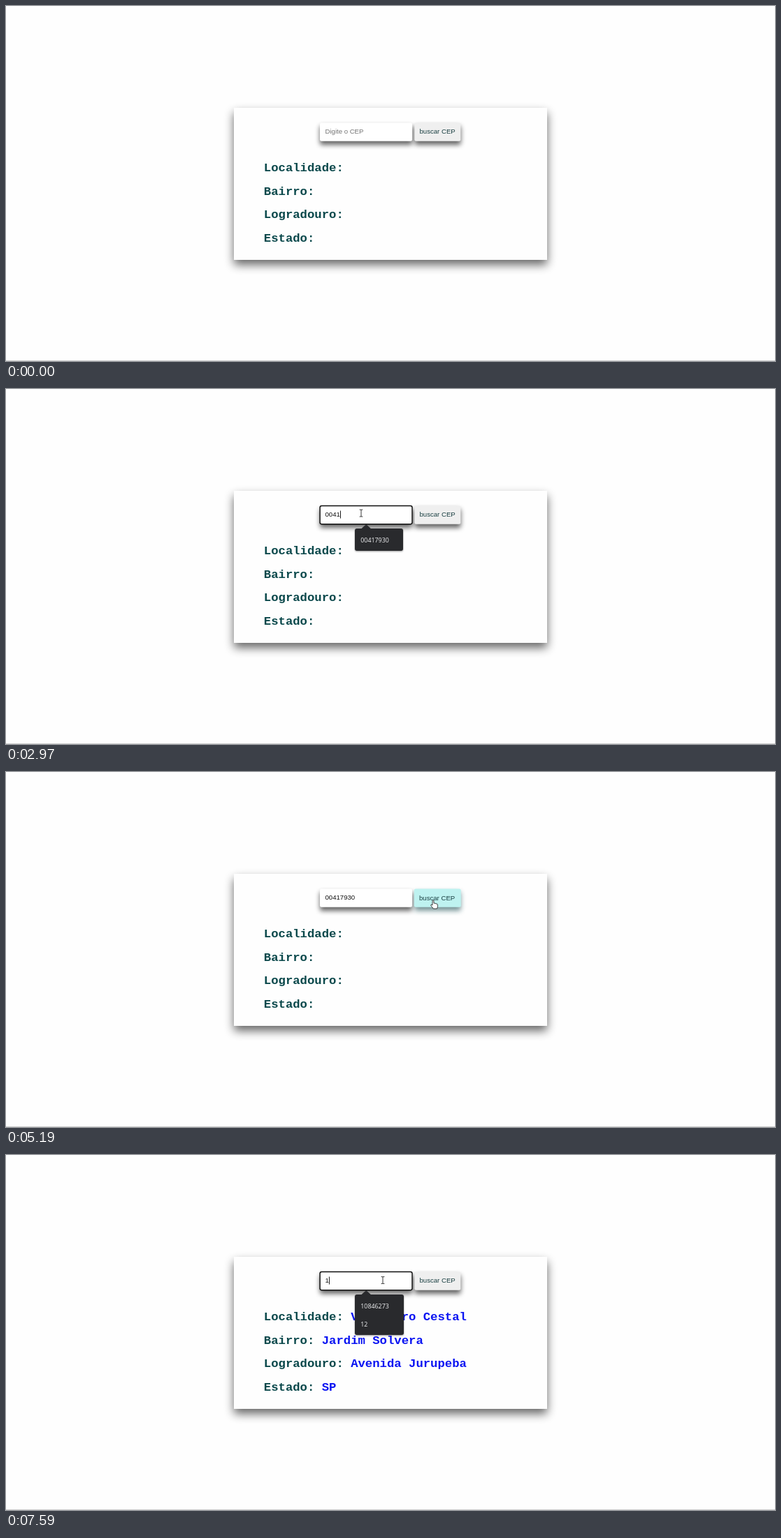
These frames come from a looping animation (1100x509 px, 8 s). An HTML page:

```html
<!DOCTYPE html>
<html lang="pt-BR">
<head>
<meta charset="utf-8">
<title>Buscar CEP</title>
<style>
html, body { margin: 0; width: 100%; height: 100%; overflow: hidden; background: #fefefe; }
svg { display: block; width: 1100px; height: 509px; }
text { white-space: pre; }
.head { font: bold 17.28px "Liberation Mono", monospace; fill: #0a484b; }
.head .val { fill: #0a14f2; }
.ui { font: 9.6px "Liberation Sans", Arial, sans-serif; }
.pop { font: 8.85px "Open Sans", "Noto Sans", sans-serif; fill: #f1f2f4; }
</style>
</head>
<body>
<svg viewBox="0 0 1100 509">
  <defs>
    <filter id="wide" x="-10%" y="-20%" width="120%" height="140%"><feGaussianBlur stdDeviation="7"/></filter>
    <filter id="soft" x="-20%" y="-60%" width="140%" height="220%"><feGaussianBlur stdDeviation="3.6"/></filter>
    <filter id="thin" x="-20%" y="-20%" width="140%" height="140%"><feGaussianBlur stdDeviation="1"/></filter>
  </defs>
  <rect width="1100" height="509" fill="#fefefe"/>
  <rect y="508" width="1100" height="1" fill="#cfcfcf"/>

  <rect x="326" y="153" width="448" height="218" fill="#000" opacity=".6" filter="url(#wide)"/>
  <rect x="326" y="146" width="448" height="218" fill="#fefefe"/>
  <g id="rows"></g>

  <rect x="449" y="172" width="132" height="27" rx="2.5" opacity=".6" filter="url(#soft)"/>
  <rect id="btnShade" x="584.5" y="172" width="66" height="27" rx="2.5" opacity=".6" filter="url(#soft)"/>
  <rect x="449" y="167.5" width="132" height="26.3" rx="2.5" fill="#fff"/>
  <rect id="ring" x="449.1" y="167.5" width="131.9" height="26.2" rx="2.4" fill="none" stroke="#101010" stroke-width="1.5"/>
  <rect id="btn" y="167.5" height="26.3" rx="2.5"/>
  <text id="btnText" class="ui" fill="#1b4043">buscar CEP</text>

  <rect id="sel" x="456.4" y="174.2" width="43" height="11.8" fill="#3390ff"/>
  <text id="field" class="ui" x="456.5" y="183.4"></text>
  <rect id="caret" y="174.5" width="0.9" height="11" fill="#000"/>

  <g id="popup">
    <rect id="popShade" x="499" y="201" width="70" rx="3" opacity=".4" filter="url(#thin)"/>
    <path d="M508 200.5L515.2 194L522.4 200.5Z" fill="#292a2d"/>
    <rect id="popBox" x="499" y="200" width="70" rx="3" fill="#292a2d"/>
    <g id="items"></g>
  </g>

  <g id="cursor">
    <path id="arrow" d="M0 0V10.2L2.3 8.1L3.9 11.6L5.4 10.9L3.9 7.5H7Z" fill="#fff" stroke="#222" stroke-width=".8"/>
    <path id="beam" d="M-2.3 -5H-.6Q0 -5 0 -4.3Q0 -5 .6 -5H2.3M0 -4.4V4.4M-2.3 5H-.6Q0 5 0 4.3Q0 5 .6 5H2.3" fill="none" stroke="#222" stroke-width=".9"/>
    <path id="hand" d="M-1 .6Q0 -.9 1 .6V4.2Q2.2 3.5 3 4.7Q4.2 4.1 4.9 5.2Q6.3 4.8 6.5 6.4V8.6Q6.4 10.3 5.4 12H.2Q-1.2 9.8 -3.2 7.5Q-3.5 5.7 -1.9 6.2L-1 7.1Z" fill="#fff" stroke="#222" stroke-width=".85"/>
  </g>
</svg>
<script>
const LOOP = 8000;
const CEP = "00417930", OTHER = "10846273";
const ROWS = [
  ["Localidade:", "Valdomiro Cestal"],
  ["Bairro:", "Jardim Solvera"],
  ["Logradouro:", "Avenida Jurupeba"],
  ["Estado:", "SP"]
];
const KEYS = [2360, 2630, 2770, 2970, 3250, 3580, 3650, 3860];
const FOCUS = 1370, CLICK = 5190, RESULT = 5330, REFOCUS = 6130, SELECT = 6400, RETYPE = 7460;
// time, x, y of the pointer
const PATH = [
  [120, 1083, 498], [880, 516, 227], [1230, 508, 178], [4380, 508, 178],
  [4580, 606.5, 185], [4930, 611, 184], [5330, 611, 184],
  [5640, 760.5, 320.5], [5700, 760.5, 320.5], [6130, 539, 179.5]
];

const $ = id => document.getElementById(id);
const set = (id, attrs) => { for (const k in attrs) $(id).setAttribute(k, attrs[k]); };
const show = (id, on) => { $(id).style.display = on ? "" : "none"; };
const ramp = (t, a, b) => Math.min(1, Math.max(0, (t - a) / (b - a)));
const ease = u => u * u * (3 - 2 * u);
const within = (t, a, b) => t >= a && t < b;
const mix = (a, b, u) => "rgb(" + a.map((v, i) => Math.round(v + (b[i] - v) * u)) + ")";

$("rows").innerHTML = ROWS.map(([name, value], i) =>
  `<text class="head" x="368.8" y="${237 + i * 33.5}">${name}<tspan class="val"> ${value}</tspan></text>`).join("");
const values = document.querySelectorAll(".val");

function pointer(t) {
  let i = 0;
  while (i < PATH.length - 2 && t >= PATH[i + 1][0]) i++;
  const [t0, x0, y0] = PATH[i], [t1, x1, y1] = PATH[i + 1];
  const u = ease(ramp(t, t0, t1));
  return [x0 + (x1 - x0) * u, y0 + (y1 - y0) * u];
}

function drawPointer(t) {
  const [x, y] = pointer(t);
  const level = y > 167 && y < 194;
  const beam = level && x > 449 && x < 581;
  const hand = level && x > 584 && x < 651;
  show("cursor", t >= 120);
  show("beam", beam);
  show("hand", hand);
  show("arrow", !beam && !hand);
  set("cursor", { transform: `translate(${x.toFixed(2)} ${y.toFixed(2)})` });
}

function drawField(t) {
  const typed = t >= RETYPE ? "1" : CEP.slice(0, KEYS.filter(k => t >= k).length);
  const selected = within(t, SELECT, RETYPE);
  const focused = within(t, FOCUS, CLICK) || t >= REFOCUS;
  $("field").textContent = typed || "Digite o CEP";
  set("field", { fill: selected ? "#fff" : typed ? "#111" : "#757575" });
  show("ring", focused);
  show("sel", selected);
  show("caret", within(t, FOCUS, 1900) || within(t, KEYS[0], 4380) ||
    within(t, REFOCUS, SELECT) || t >= RETYPE);
  set("caret", { x: 456.6 + typed.length * 5.34 });
}

function drawPopup(t) {
  let list = [];
  if (within(t, 1440, 2430)) list = [OTHER, CEP, "12"];
  else if (within(t, 2430, 4050)) list = [CEP];
  else if (t >= 7590) list = [OTHER, "12"];
  show("popup", list.length);
  const height = 6 + 26 * list.length;
  const width = list.length === 1 ? 69 : 70;
  set("popBox", { height, width });
  set("popShade", { height, width });
  set("popup", { opacity: t < 4050 ? 1 - ramp(t, 3910, 4050) : 1 });
  $("items").innerHTML = list.map((s, i) =>
    `<text class="pop" x="507.3" y="${219.6 + i * 26}">${s}</text>`).join("");
}

function drawButton(t) {
  const hot = ramp(t, 4490, 4930) * (1 - ramp(t, REFOCUS, 6420));
  const grow = hot > 0 ? 0.5 : 0;
  set("btn", { x: 584.3 - grow, width: 66 + 2 * grow, fill: mix([239, 239, 239], [190, 242, 240], hot) });
  set("btnShade", { fill: mix([0, 0, 0], [30, 80, 85], hot) });
  set("btnText", { x: 591.5 - grow, y: 183.4 + grow });
}

function draw(t) {
  values.forEach(v => { v.style.display = t >= RESULT ? "" : "none"; });
  drawField(t);
  drawButton(t);
  drawPopup(t);
  drawPointer(t);
}

const start = performance.now();
function tick() {
  draw((performance.now() - start) % LOOP);
  requestAnimationFrame(tick);
}
tick();
</script>
</body>
</html>
```
